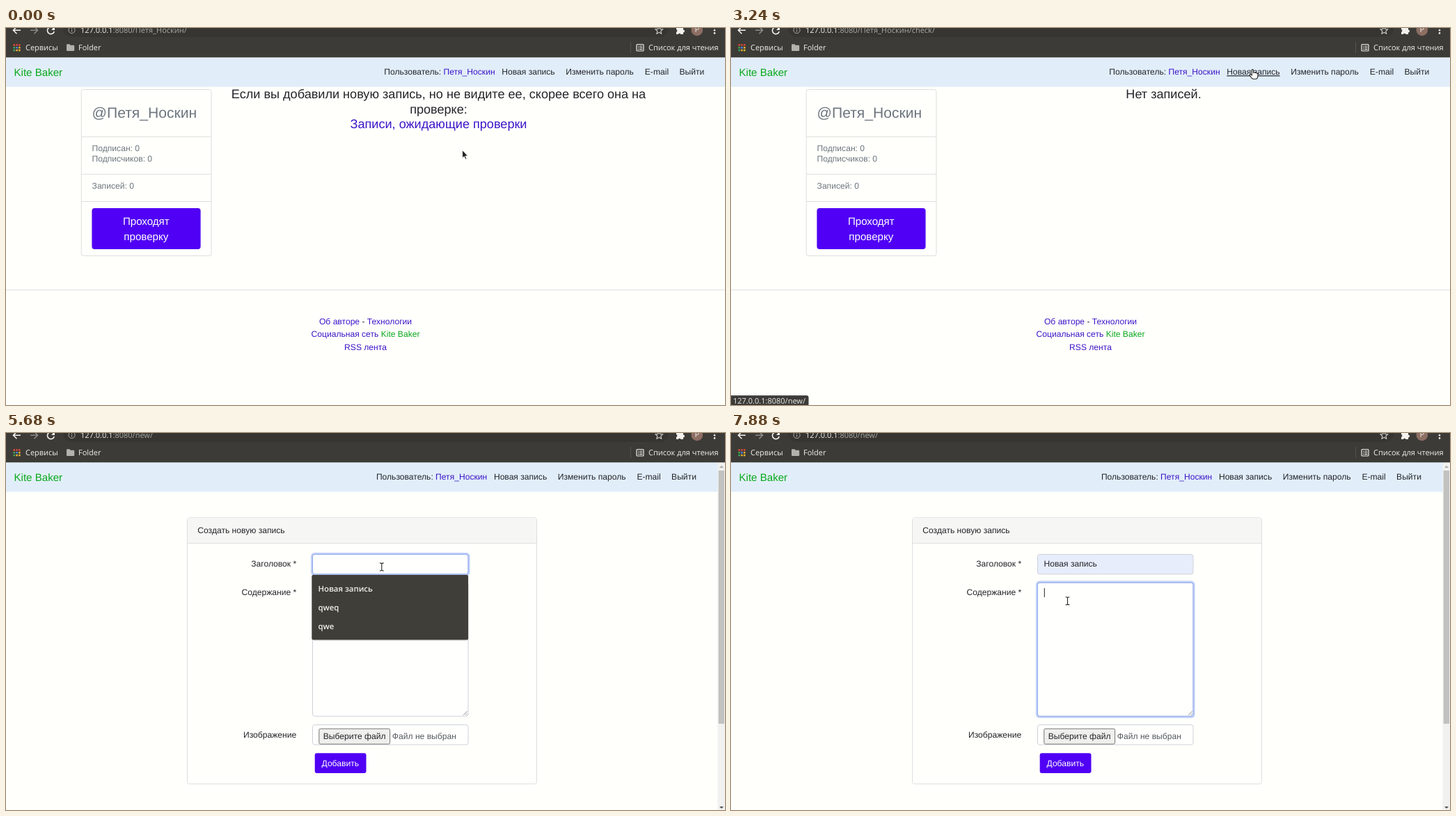
Recreate the animation shown at these times as an HTML page. Size 1033 by 542 pixels, loop 8000 ms.

```html
<!DOCTYPE html>
<html lang="ru">
<head>
<meta charset="utf-8">
<title>Новая запись</title>
<style>
  html, body { margin: 0; width: 100%; height: 100%; overflow: hidden; background: #fffffc; }
  svg { display: block; width: 100vw; height: 100vh; }
  text { font: 12.1px "Liberation Sans", Arial, sans-serif; fill: #24242a; text-rendering: geometricPrecision; white-space: pre; }
  .ui { font: 11px "Open Sans", "Noto Sans", sans-serif; fill: #f0efeb; }
  .item { font-size: 11.4px; font-weight: 600; }
  .dim { fill: #aaa9a3; }
  .brand { font-size: 15.1px; fill: #0aa81c; }
  .green { fill: #0aa81c; }
  .link { fill: #3c14c8; }
  .grey { fill: #6c757d; }
  .h3 { font-size: 21.1px; }
  .h4 { font-size: 18.1px; }
  .btn { fill: #fff; }
  .big { font-size: 15.1px; }
  .mid { text-anchor: middle; }
  .end { text-anchor: end; }
  .under { text-decoration: underline; }
</style>
</head>
<body>
<svg id="stage" viewBox="0 0 1033 542" xmlns="http://www.w3.org/2000/svg"></svg>
<script>
const LOOP = 8000, TICK = 40;
const USER = 'Петя_Носкин', BRAND = 'Kite Baker', HOST = '127.0.0.1';
const PAPER = '#fffffc', DARK = '#3c3b37', ACCENT = '#5000f4', EDGE = '#dededc';

const text = (x, y, s, cls = '', id = '') => `<text id="${id}" x="${x}" y="${y}" class="${cls}">${s}</text>`;
const span = (cls, s) => `<tspan class="${cls}">${s}</tspan>`;
const box = (x, y, w, h, fill, extra = '') => `<rect x="${x}" y="${y}" width="${w}" height="${h}" fill="${fill}" ${extra}/>`;
const line = (d, stroke, w = 1, extra = '') => `<path d="${d}" fill="none" stroke="${stroke}" stroke-width="${w}" ${extra}/>`;
const group = (id, body) => `<g id="${id}">${body}</g>`;
const field = (y, h, id = '') => box(440.5, y, 223.5, h, '#fffffe', `rx="3" stroke="#ced2d8" id="${id}"`);
const ring = (id, y, h) => group(id,
  box(439.2, y - 1.3, 226.1, h + 2.6, 'none', 'rx="4" stroke="#c3d1f8" stroke-width="2.6"') +
  box(440.5, y, 223.5, h, 'none', 'rx="3" stroke="#8ca8ee"'));

function chrome() {
  const dotColors = ['#e5493a', '#e5493a', '#e5493a', '#3fa757', '#4a86e8', '#eab830', '#3fa757', '#eab830', '#eab830'];
  const dots = dotColors.map((c, i) => box(10.5 + i % 3 * 3.8, 23.2 + Math.floor(i / 3) * 3.8, 2.5, 2.5, c)).join('');
  return box(0, 0, 1033, 42.3, DARK) +
    box(82, -13, 870, 26, '#363531', 'rx="13"') +
    line('M21 3.2H10.8M15.5-2l-5 5.2 5 5', '#f2f1ed', 1.6) +
    line('M35 3.2H45.2M40.5-2l5 5.2-5 5', '#8b8a84', 1.6) +
    group('reload', line('M69 1.5A5 5 0 1 0 69.3 5', '#f2f1ed', 1.6) + '<path d="M70-2v5h-5z" fill="#f2f1ed"/>') +
    group('stop', line('M60-1l8 8M68-1l-8 8', '#f2f1ed', 1.6)) +
    '<circle cx="94.5" cy="3" r="4.6" fill="none" stroke="#aaa9a3"/>' + line('M94.5 2.4V5.6M94.5 0v1.2', '#aaa9a3', 1.1) +
    `<text x="107" y="6.6" class="ui">${HOST}<tspan id="path" class="dim"></tspan></text>` +
    line('M938.3-2l1.6 3.5 3.7.4-2.8 2.5.8 3.8-3.3-1.9-3.3 1.9.8-3.8-2.8-2.5 3.7-.4z', '#d8d7d2', 1.1) +
    '<path d="M963-1h3.5a2 2 0 0 1 4 0H973v3.5a2 2 0 0 1 0 4V9h-3.5a2 2 0 0 0-3.6 0H963V5.8a2 2 0 0 0 0-3.8z" fill="#f2f1ed"/>' +
    '<circle cx="992.8" cy="3" r="8.3" fill="#8d6e63"/>' +
    text(992.8, 6.4, 'P', 'ui mid') +
    [-1, 3.2, 7.4].map(y => `<circle cx="1018" cy="${y}" r="1.3" fill="#f2f1ed"/>`).join('') +
    dots + text(28, 31.8, 'Сервисы', 'ui') +
    '<path d="M87 24.2q0-1 1-1h3.4l1.4 1.5h4.4q1 0 1 1v6.3q0 1-1 1h-9.2q-1 0-1-1z" fill="#b3b2ac"/>' +
    text(104, 31.8, 'Folder', 'ui') +
    line('M897.5 20V36', '#55544f') +
    box(906, 23.5, 10, 9.5, 'none', 'rx="1" stroke="#efeeea" stroke-width="1.2"') +
    line('M908 26h1.3M908 28.3h1.3M908 30.6h1.3M910.3 26h4M910.3 28.3h4M910.3 30.6h4', '#efeeea', 1.1) +
    text(923, 31.8, 'Список для чтения', 'ui');
}

function navbar() {
  return box(0, 42.3, 1033, 42.3, '#e1eef9') + text(11.5, 68.7, BRAND, 'brand') +
    group('menu',
      text(543.3, 67.2, 'Пользователь:') + text(628.5, 67.2, USER, 'link') +
      text(712.3, 67.2, 'Новая запись', '', 'newLink') + text(804.2, 67.2, 'Изменить пароль') +
      text(917.8, 67.2, 'E-mail') + text(967.5, 67.2, 'Выйти'));
}

function profilePage() {
  return box(108.2, 88.5, 186.8, 239, 'none', `rx="3" stroke="${EDGE}"`) +
    line('M108 156.4H295M108 210.2H295M108 249.5H295', EDGE) +
    text(123.6, 129.4, '@' + USER, 'h3 grey') +
    text(123.6, 177.2, 'Подписан: 0', 'grey') + text(123.6, 191.6, 'Подписчиков: 0', 'grey') +
    text(123.6, 231, 'Записей: 0', 'grey') +
    box(123.4, 259, 156.2, 59, ACCENT, 'rx="4"') +
    text(201.3, 282.5, 'Проходят', 'btn big mid') + text(201.3, 305.2, 'проверку', 'btn big mid') +
    group('notice',
      text(621.5, 101.3, 'Если вы добавили новую запись, но не видите ее, скорее всего она на', 'h4 mid') +
      text(621.5, 122.6, 'проверке:', 'h4 mid') +
      text(621.5, 144, 'Записи, ожидающие проверки', 'h4 mid link', 'pendingLink')) +
    group('empty', text(621.5, 101.3, 'Нет записей.', 'h4 mid')) +
    line('M0 376.6H1033', EDGE) +
    text(516.5, 426.3, span('link', 'Об авторе') + ' - ' + span('link', 'Технологии'), 'mid') +
    text(516.5, 444.4, span('link', 'Социальная сеть ') + span('green', BRAND), 'mid') +
    text(516.5, 462.5, 'RSS лента', 'mid link');
}

function formPage() {
  return box(260.5, 121.8, 502, 382.7, PAPER, `rx="3" stroke="${EDGE}"`) +
    box(261, 122.3, 501, 36, '#f6f6f4') + line('M260.5 158.6H762.5', EDGE) +
    text(275.3, 144, 'Создать новую запись') +
    text(417.2, 192.2, 'Заголовок *', 'end') + text(417.2, 233.2, 'Содержание *', 'end') +
    text(417.2, 437.8, 'Изображение', 'end') +
    field(174.5, 28.4, 'titleField') + field(215.2, 192) + field(419.6, 28.5) +
    line('M657 405.6l5.5-5.5M660.3 405.6l2.2-2.2', '#85858a') +
    text(449.6, 192.2, 'Новая запись', '', 'titleText') +
    ring('titleRing', 174.5, 28.4) + ring('bodyRing', 215.2, 192) +
    line('M450.3 181.5V195', '#222', 1, 'id="startCaret"') +
    line('M526.4 181.5V195', '#222', 1, 'id="endCaret"') +
    line('M450.3 223V236', '#222', 1, 'id="bodyCaret"') +
    box(449.8, 425.2, 101.8, 22, '#efefed', 'rx="2" stroke="#777"') +
    text(500.6, 440, 'Выберите файл', 'mid') + text(554.8, 440, 'Файл не выбран', 'dimText') +
    box(443.7, 460.2, 73.8, 28.8, ACCENT, 'rx="3"') + text(480.3, 478.8, 'Добавить', 'btn mid') +
    box(1022.4, 42.3, 10.6, 499.7, '#f1f1ef') + box(1023.7, 54, 8.3, 364, '#c1c1c0') +
    '<path d="M1025 50l3-3 3 3z" fill="#a5a5a3"/><path d="M1025 537l3 3 3-3z" fill="#505050"/>' +
    group('suggest',
      box(440, 205.5, 224, 93, '#0003', 'rx="3"') + box(439.3, 204, 224.8, 93.2, '#3f3e39', 'rx="2"') +
      box(439.3, 209.6, 224.8, 27.5, '#5f5e59', 'id="hover"') +
      ['Новая запись', 'qweq', 'qwe'].map((s, i) => text(448.4, 227.6 + i * 27.2, s, 'ui item')).join(''));
}

function status(id, path, width) {
  return group(id, `<path d="M0 528.3H${width - 3}q3 0 3 3V542H0z" fill="${DARK}"/>` + text(3, 540.3, HOST + path, 'ui'));
}

// Pointer shapes have their hotspot at 0,0.
const pointers =
  group('arrow', '<path d="M0 0V11.6L2.6 9.2 4.6 13.6 6.4 12.8 4.5 8.5H8Z" fill="#222" stroke="#fff" stroke-width=".9"/>') +
  group('hand', '<path d="M-1.2.9Q0-.5 1 .9V5Q2.6 3.9 3.4 5.2 5 4.4 5.6 5.8 7.2 5.2 7.4 6.8V10Q7.2 13.8 4.4 14H.8Q-1.4 13.6-2.6 11.2L-4.3 8.6Q-4.4 6.9-2.7 7.4L-1.2 8.8Z" fill="#fff" stroke="#222" stroke-width="1.1" stroke-linejoin="round"/>') +
  group('beam', line('M-2.8-5.6Q0-5.6 0-4.6 0-5.6 2.8-5.6M0-4.8V4.8M-2.8 5.6Q0 5.6 0 4.6 0 5.6 2.8 5.6', '#fff', 2.4) +
    line('M-2.8-5.6Q0-5.6 0-4.6 0-5.6 2.8-5.6M0-4.8V4.8M-2.8 5.6Q0 5.6 0 4.6 0 5.6 2.8 5.6', '#222', 1.1));

document.getElementById('stage').innerHTML =
  box(0, 0, 1033, 542, PAPER) + navbar() + group('profile', profilePage()) + group('form', formPage()) + chrome() +
  status('checkStatus', `:8080/${USER}/check/`, 193) + status('newStatus', ':8080/new/', 111.5) + group('pointer', pointers);
document.querySelector('.dimText').style.fill = '#55595e';

const el = id => document.getElementById(id);
const show = (id, on) => { el(id).style.display = on ? '' : 'none'; };
const fade = (id, v) => { show(id, v > 0); el(id).style.opacity = v; };
const ramp = (t, a, b) => Math.min(1, Math.max(0, (t - a) / (b - a)));
const during = (t, a, b = LOOP) => t >= a && t < b;

// [time, x, y]
const route = [
  [0, 655.6, 175.5], [440, 655.6, 175.5], [800, 655, 151], [960, 655, 151], [1120, 659.5, 142.8],
  [2480, 659.5, 142.8], [2960, 749.5, 59.3], [4440, 749.5, 59.3], [4880, 539.8, 192.5],
  [5680, 539.8, 192.5], [5840, 503.5, 222], [6440, 503.5, 222], [6800, 483.5, 241.3], [LOOP, 483.5, 241.3]
];
const shapes = [[0, 'arrow'], [1080, 'hand'], [2200, 'arrow'], [2920, 'hand'], [4400, 'arrow'], [4840, 'beam']];
const paths = [[0, `:8080/${USER}/`], [1880, `:8080/${USER}/check/`], [4160, ':8080/new/']];
const latest = (table, t) => table.filter(row => row[0] <= t).pop()[1];

function place(t) {
  const i = Math.max(1, route.findIndex(p => p[0] >= t));
  const [a, b] = [route[i - 1], route[i]], k = ramp(t, a[0], b[0]);
  return [a[1] + (b[1] - a[1]) * k, a[2] + (b[2] - a[2]) * k];
}

function render(t) {
  const onForm = t >= 4280, loading = during(t, 1640, 2120) || during(t, 3880, 4280);
  show('profile', !onForm);
  show('form', onForm);
  show('notice', t < 2120);
  show('empty', t >= 2120);
  show('reload', !loading);
  show('stop', loading);
  el('path').textContent = latest(paths, t);
  el('menu').setAttribute('transform', `translate(${onForm ? -11.4 : 0})`);
  el('pendingLink').classList.toggle('under', during(t, 1080, 2120));
  el('newLink').classList.toggle('under', during(t, 2920, 4280));
  fade('checkStatus', ramp(t, 1160, 1360) - ramp(t, 2120, 2320));
  fade('newStatus', ramp(t, 3040, 3240) - ramp(t, 4360, 4560));

  const filled = t >= 5840;
  show('titleText', filled);
  el('titleField').setAttribute('fill', filled ? '#e8edfb' : '#fffffe');
  fade('titleRing', ramp(t, 5080, 5240) - ramp(t, 7600, 7800));
  fade('bodyRing', ramp(t, 7600, 7800));
  show('startCaret', during(t, 5120, 5640));
  show('endCaret', during(t, 6280, 6800));
  show('bodyCaret', during(t, 7640));

  const open = ramp(t, 5080, 5240) - ramp(t, 6280, 6460);
  fade('suggest', open);
  show('hover', filled);
  el('suggest').setAttribute('transform', `translate(551.7 250.6) scale(${1 - .045 * (1 - open)}) translate(-551.7 -250.6)`);

  const shape = latest(shapes, t);
  for (const id of ['arrow', 'hand', 'beam']) show(id, id === shape);
  el('pointer').setAttribute('transform', `translate(${place(t)})`);
}

const start = performance.now();
function tick() {
  const t = Math.max(0, performance.now() - start) % LOOP;
  render(Math.floor(t / TICK) * TICK);
  requestAnimationFrame(tick);
}
tick();
</script>
</body>
</html>
```
